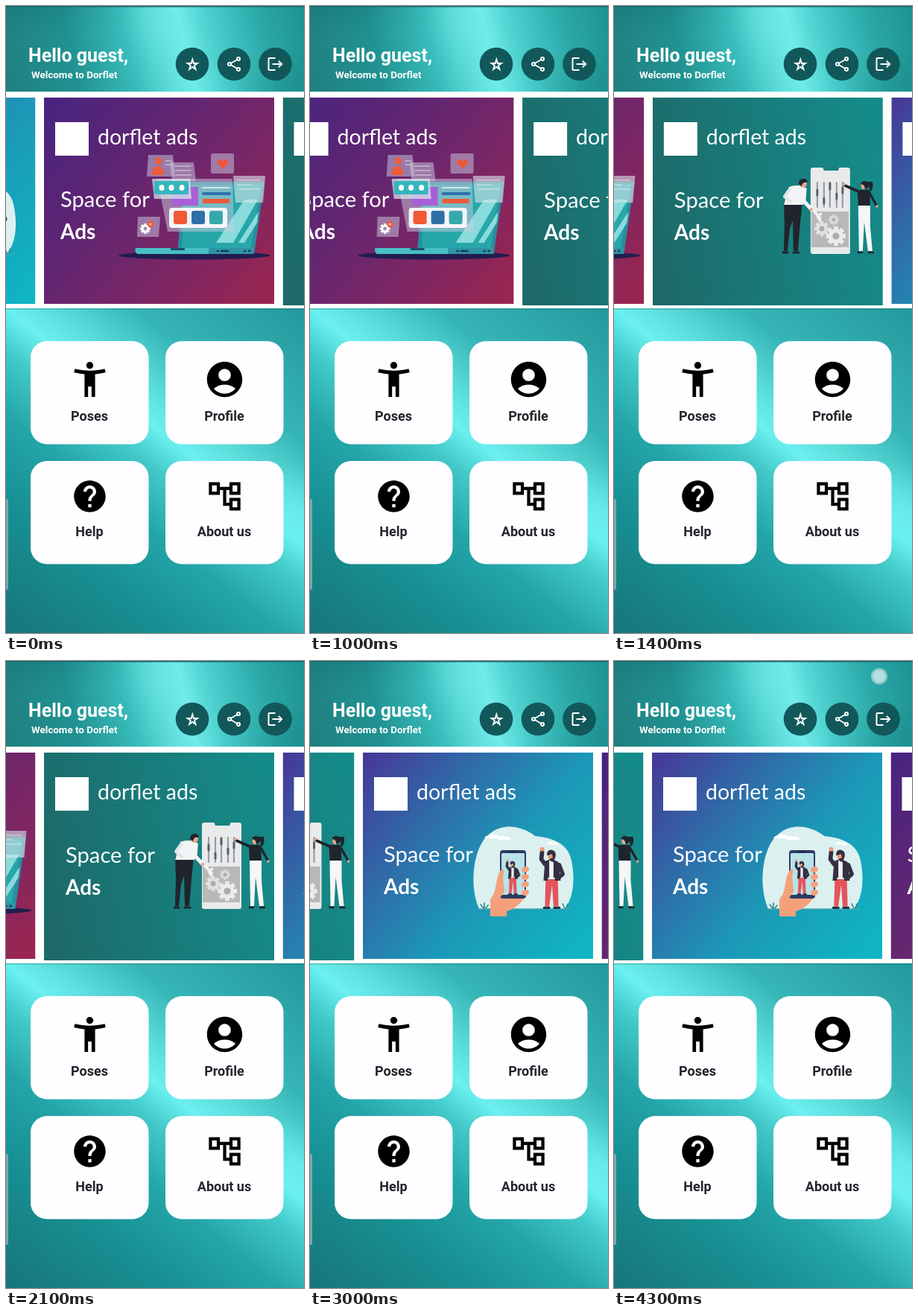
Recreate the animation shown at these times as an HTML page with a canvas. Size 400x842 px, loop 4500 ms.

```html
<!DOCTYPE html>
<html lang="en">
<head>
<meta charset="utf-8">
<title>Home screen</title>
<style>
html, body { margin: 0; width: 100%; height: 100%; overflow: hidden; background: #1c9090; }
canvas { display: block; width: 400px; height: 842px; }
</style>
</head>
<body>
<canvas id="stage"></canvas>
<script>
const W = 400, H = 842, LOOP = 4500, STEP = 100;
const CARD = { x: 51, w: 309, pitch: 320.5 };
const SLIDES = [{ start: 842, time: 600 }, { start: 2441, time: 800 }];
const ratio = Math.max(1, window.devicePixelRatio || 1);
const stage = document.getElementById('stage');

function prepare(canvas) {
  canvas.width = W * ratio;
  canvas.height = H * ratio;
  const c = canvas.getContext('2d');
  c.scale(ratio, ratio);
  return c;
}
const screen2d = prepare(stage);
let g = screen2d;

// Drawing helpers
function rect(x, y, w, h, color, r = 0) {
  g.fillStyle = color;
  g.beginPath();
  g.roundRect(x, y, w, h, r);
  g.fill();
}
function ellipse(x, y, rx, ry, color, turn = 0) {
  g.fillStyle = color;
  g.beginPath();
  g.ellipse(x, y, rx, ry, turn, 0, Math.PI * 2);
  g.fill();
}
const dot = (x, y, r, color) => ellipse(x, y, r, r, color);
function shape(d, color) {
  g.fillStyle = color;
  g.fill(new Path2D(d));
}
function line(d, color, width) {
  g.strokeStyle = color;
  g.lineWidth = width;
  g.lineCap = g.lineJoin = 'round';
  g.stroke(new Path2D(d));
}
function text(str, x, y, font, color = '#fff', align = 'left') {
  g.font = font;
  g.fillStyle = color;
  g.textAlign = align;
  g.fillText(str, x, y);
}
function blend([x0, y0, x1, y1], stops) {
  const fill = g.createLinearGradient(x0, y0, x1, y1);
  stops.forEach(([at, color]) => fill.addColorStop(at, color));
  return fill;
}
function glow(x, y, rx, ry, turn, rgb, alpha) {
  g.save();
  g.translate(x, y);
  g.rotate(turn);
  g.scale(rx, ry);
  const fill = g.createRadialGradient(0, 0, 0, 0, 0, 1);
  for (let i = 0; i <= 4; i++) {
    fill.addColorStop(i / 4, `rgba(${rgb},${alpha * (1 - i / 4) ** 1.4})`);
  }
  dot(0, 0, 1, fill);
  g.restore();
}
function icon(d, x, y, scale, color) {
  g.save();
  g.translate(x, y);
  g.scale(scale, scale);
  g.translate(-12, -12);
  shape(d, color);
  g.restore();
}
function gear(x, y, r, color, hole) {
  g.strokeStyle = color;
  g.lineWidth = r * 0.45;
  g.lineCap = 'butt';
  for (let i = 0; i < 8; i++) {
    const a = i * Math.PI / 4;
    g.beginPath();
    g.moveTo(x, y);
    g.lineTo(x + Math.cos(a) * r, y + Math.sin(a) * r);
    g.stroke();
  }
  dot(x, y, r * 0.75, color);
  dot(x, y, r * 0.35, hole);
}

// Brushed metal backdrop
function drawHeader() {
  g.save();
  g.beginPath();
  g.rect(0, 0, W, 115);
  g.clip();
  rect(0, 0, W, 115, blend([0, 95, 410, 0], [
    [0, '#20807f'], [.22, '#219292'], [.4, '#38bcbb'], [.53, '#62e0df'],
    [.58, '#6febe9'], [.67, '#4bcfce'], [.83, '#2aa8a8'], [1, '#1d8e8f']]));
  glow(205, 30, 55, 130, -.35, '115,240,240', .4);
  glow(30, 0, 170, 45, 0, '20,105,106', .35);
  glow(395, 105, 130, 60, -.3, '20,125,126', .4);
  rect(0, 0, W, 1.5, '#176a6b');
  g.restore();
}
function drawLowerMetal() {
  g.save();
  g.beginPath();
  g.rect(0, 406, W, H - 406);
  g.clip();
  rect(0, 406, W, H - 406, blend([-6, 826, 352, 373], [
    [0, '#18777c'], [.22, '#178f92'], [.38, '#23a5a7'], [.5, '#43c9c9'],
    [.575, '#6bf0ef'], [.64, '#5cdedd'], [.76, '#36b5b7'], [1, '#24999d']]));
  glow(395, 680, 90, 60, .6, '112,244,246', .5);
  rect(0, 406, W, 1.5, 'rgba(20,100,102,.35)');
  g.restore();
}

// Carousel pictures, laid out with the card's left edge at CARD.x
function laptopPicture() {
  const glass = 'rgba(205,205,225,.5)', pale = 'rgba(235,240,248,.8)';
  ellipse(253, 335, 102, 5.5, '#211d50');
  shape('M238 236H347L333 333H230Z', '#2b8c9c');
  shape('M242 240H342L329 325H236Z', '#27a7aa');
  shape('M320 260H338L305 318H282Z M339 276L337 291L320 318H312Z', '#8adbdc');
  shape('M174 325H272V333H176Q172 329 174 325Z', '#48bec5');
  shape('M272 325H334L332 333H272Z', '#2f93a4');
  rect(221, 325, 19, 3, '#1d4e68', 1);
  line('M284 329h1 M289 329h9 M320 329h1 M326 329h1', '#173c56', 2.5);
  shape('M203 232H304L306 303H217Z', glass);
  shape('M221 243H258V268H224Z', '#a860d6');
  line('M264 244H300', pale, 2);
  line('M265 252H300', '#2f72a8', 4);
  rect(264, 259, 36, 6, '#ec5a38', 1);
  rect(219, 271, 78, 27, '#f4f5f8', 4);
  ['#ee5a35', '#2f6fa8', '#36a9ac'].forEach((c, i) => rect(225 + i * 24, 275, 18, 18, c, 3));
  shape('M220 210H252L255 235H223Z', glass);
  line('M226 215H248 M227 221H248 M228 227H249', pale, 1.2);
  shape('M196 232H247L249 259H199Z', 'rgba(220,235,240,.7)');
  rect(199, 235, 46, 18, '#36b5bd', 2);
  [209, 222, 236].forEach(x => ellipse(x, 244, 3.5, 4, '#fff'));
  shape('M191 200H224L227 229H189Z', glass);
  dot(205, 208, 4.5, '#ef5c36');
  shape('M196 227Q196 215 204 215Q212 215 211 227Z', '#ef5c36');
  line('M214 208H222 M214 213H223', pale, 1.2);
  rect(275, 198, 31, 27, glass, 2);
  shape('M291 218Q280 210 286 206Q290 205 291 209Q293 205 297 207Q301 211 291 218Z', '#ee5637');
  shape('M305 228H348L345 264H308Z', 'rgba(215,230,235,.6)');
  line('M310 234H341 M311 240H330 M312 246H341', pale, 1.2);
  shape('M177 283H207L205 310H176Z', glass);
  gear(187, 299, 7, '#fff', '#a788a3');
  gear(194, 293, 4.5, '#ef5c36', '#d8c5d0');
}
function phonePicture() {
  const dark = '#20242c', skin = '#e9a78d';
  rect(263, 217, 53, 116, '#e9eaec', 3);
  shape('M279 216H302L300 221H281Z', '#17817f');
  rect(264, 276, 50, 48, '#b6b8ba');
  line('M272 237V270 M281 237V270 M289 237V270 M298 237V270 M306 237V270', '#999da0', 2.2);
  line('M272 247V254 M281 258V265 M289 238V246 M298 252V259 M306 244V251', '#5b6065', 3);
  gear(278, 299, 10, '#dfe1e3', '#a9abad');
  gear(297, 309, 13, '#e9ebed', '#a9abad');
  gear(294, 287, 7, '#d7d9db', '#a9abad');
  line('M262 269L276 285', '#f1f2f4', 4);
  line('M277 279L272 283L276 289', '#f1f2f4', 3);
  // man
  shape('M227 263H252L249 292L246 329H240L239 288L235 300L232 329H227L228 292Z', dark);
  shape('M234 243Q246 238 258 245L253 267H227Z', '#f3f4f5');
  line('M255 249L254 262L264 273', '#f3f4f5', 5);
  line('M235 246L228 256L236 263', '#e3e5e8', 4);
  dot(264, 273, 2.3, skin);
  dot(253, 239, 5, skin);
  shape('M247 239Q247 231 255 232Q261 235 258 237Q252 236 251 242Z', dark);
  line('M226 331H232 M240 331H247', dark, 3);
  // woman
  line('M327 249L309 241', dark, 3.6);
  line('M342 251L351 267', dark, 3.4);
  dot(308, 239, 2, skin);
  dot(352, 269, 1.8, skin);
  shape('M326 247H342L343 270H327Z', dark);
  shape('M327 268H343L343 295L346 329H340L335 290L333 329H328Z', '#f5f6f7');
  dot(335, 242, 4.3, skin);
  shape('M330 239Q332 233 339 236L346 236Q348 243 344 249Q341 248 342 242L336 247Q336 239 330 239Z', dark);
  line('M327 331H332 M341 331H347', dark, 2.6);
}
function waver(x, y, scale) {
  g.save();
  g.translate(x, y);
  g.scale(scale, scale);
  shape('M-8 26H9L10 64H3L1 34L-3 64H-9Z', '#e5545c');
  shape('M-9 1Q0 -4 10 2L13 28H5V24H-5V28H-11Z', '#352f42');
  rect(-3, 0, 6, 25, '#eef3f4');
  line('M-9 5L-14 -2L-13 -12', '#352f42', 6);
  line('M11 6L16 19L9 25', '#352f42', 5.5);
  dot(-13, -16, 3, '#f09a78');
  ellipse(0, -7, 5, 6.5, '#f09a78');
  shape('M-6 -7Q-7 -15 0 -15Q7 -14 6 -6L3 2Q-1 2 -3 -2L2 -4L1 -9Z', '#352f42');
  line('M-10 66H-3 M4 66H11', '#24304c', 3.5);
  g.restore();
}
function selfiePicture() {
  const skin = '#f4a17b';
  shape('M207 333C191 295 202 242 224 230C243 216 269 224 282 235C302 237 326 243 331 268C337 298 332 320 322 333Z', '#dcf0f0');
  shape('M214 238Q216 233 220 236Q223 229 228 234Q233 232 235 238Z M297 246Q302 240 306 244Q311 241 314 247Z M231 240Q236 232 241 236Q247 234 250 240Z', '#fff');
  line('M206 333H330', '#4fa6ad', 1.4);
  line('M213 332L209 327 M214 332V325 M216 332L219 328 M322 332L319 326 M324 332L326 326', '#2f8792', 1.6);
  shape('M222 343V320Q228 313 229 304L237 280L246 318L267 319Q257 333 244 336V343Z', skin);
  rect(235, 254, 35, 65, '#2c3b62', 4);
  rect(237, 258, 31, 56, '#b8e3e7', 1.5);
  rect(247, 255, 10, 2.5, '#1e294a', 1);
  waver(252, 277, .55);
  shape('M229 307Q231 285 238 279Q242 280 239 289L241 310L234 319Z', skin);
  [280, 290, 300, 311].forEach(y => ellipse(269, y, 5, 4, skin, -.2));
  waver(304, 268, .96);
}
const DIAGONAL = [51, 140, 360, 385];
const ADS = [
  { bottom: 400, textX: 73, drop: 0, picture: laptopPicture, axis: DIAGONAL,
    stops: [[0, '#48247f'], [.4, '#642670'], [.75, '#822660'], [1, '#9a264f']] },
  { bottom: 402, textX: 80, drop: 1, picture: phonePicture, axis: [51, 290, 360, 230],
    stops: [[0, '#1d6a69'], [.4, '#197877'], [1, '#158b89']] },
  { bottom: 400, textX: 79, drop: 0, picture: selfiePicture, axis: DIAGONAL,
    stops: [[0, '#453b98'], [.28, '#306aa8'], [.58, '#1c98b7'], [1, '#0fb6c3']] }
];
function drawAd(ad, x) {
  g.save();
  g.translate(x - CARD.x, 0);
  g.beginPath();
  g.rect(CARD.x, 123, CARD.w, ad.bottom - 123);
  g.clip();
  rect(CARD.x, 123, CARD.w, 279, blend(ad.axis, ad.stops));
  rect(66, 156, 45, 45, '#fff');
  text('dorflet ads', 123, 186, '28.5px Lato, sans-serif');
  text('Space for', ad.textX, 270 + ad.drop, '29.2px Lato, sans-serif');
  text('Ads', ad.textX, 313 + ad.drop, 'bold 28px Lato, sans-serif');
  ad.picture();
  g.restore();
}

// Fixed interface
const ICONS = {
  pose: 'M20.5 6c-2.61.7-5.67 1-8.5 1s-5.89-.3-8.5-1L3 8c1.86.5 4 .83 6 1v13h2v-6h2v6h2V9c2-.17 4.14-.5 6-1l-.5-2zM12 6c1.1 0 2-.9 2-2s-.9-2-2-2-2 .9-2 2 .9 2 2 2z',
  profile: 'M12 2C6.48 2 2 6.48 2 12s4.48 10 10 10 10-4.48 10-10S17.52 2 12 2zm0 4c1.93 0 3.5 1.57 3.5 3.5S13.93 13 12 13s-3.5-1.57-3.5-3.5S10.07 6 12 6zm0 14c-2.03 0-4.43-.82-6.14-2.88C7.55 15.8 9.68 15 12 15s4.45.8 6.14 2.12C16.43 19.18 14.03 20 12 20z',
  help: 'M12 2C6.48 2 2 6.48 2 12s4.48 10 10 10 10-4.48 10-10S17.52 2 12 2zm1 17h-2v-2h2v2zm2.07-7.75l-.9.92C13.45 12.9 13 13.5 13 15h-2v-.5c0-1.1.45-2.1 1.17-2.83l1.24-1.26c.37-.36.59-.86.59-1.41 0-1.1-.9-2-2-2s-2 .9-2 2H8c0-2.21 1.79-4 4-4s4 1.79 4 4c0 .88-.36 1.68-.93 2.25z',
  tree: 'M22 11V3h-7v3H9V3H2v8h7V8h2v10h4v3h7v-8h-7v3h-2V8h2v3h7zM7 9H4V5h3v4zm10 6h3v4h-3v-4zm0-10h3v4h-3V5z',
  leave: 'M17 7l-1.41 1.41L18.17 11H8v2h10.17l-2.58 2.58L17 17l5-5zM4 5h8V3H4c-1.1 0-2 .9-2 2v14c0 1.1.9 2 2 2h8v-2H4V5z',
  star: 'M12 8.89L12.94 12h2.82l-2.27 1.62.93 3.01L12 14.79l-2.42 1.84.93-3.01L8.24 12h2.82L12 8.89M12 2l-2.42 8H2l6.17 4.41L5.83 22 12 17.31 18.18 22l-2.35-7.59L22 10h-7.58L12 2z'
};
function tile(x, y, label, d, scale, iconY, labelY) {
  rect(x, y, 158.5, 138.5, '#fefdff', 22);
  icon(d, x + 79.5, iconY, scale, '#000');
  text(label, x + 79, labelY, 'bold 18px Roboto, sans-serif', '#24242a', 'center');
}
function drawInterface() {
  drawHeader();
  drawLowerMetal();
  rect(0, 115, W, 291, '#fff');
  text('Hello guest,', 30, 75, 'bold 25px Roboto, sans-serif');
  text('Welcome to Dorflet', 34, 96.5, 'bold 13.4px Roboto, sans-serif');
  [250, 306, 361.5].forEach(x => dot(x, 78, 22.3, '#12585a'));
  g.save();
  g.clip(new Path2D('M228 56H272V100H228Z'));
  icon(ICONS.star, 250.3, 78, .95, '#fff');
  g.restore();
  line('M312 71L300 78L312 85', '#fff', 1.8);
  [[312, 71], [300, 78], [312, 85]].forEach(([x, y]) => {
    dot(x, y, 3, '#fff');
    dot(x, y, 1.1, '#12585a');
  });
  icon(ICONS.leave, 361.5, 78, 1, '#fff');
  tile(33, 450, 'Poses', ICONS.pose, 2.36, 501.5, 557);
  tile(214, 450, 'Profile', ICONS.profile, 2.37, 501.5, 557);
  tile(33, 611, 'Help', ICONS.help, 2.12, 658.5, 711.5);
  tile(214, 611, 'About us', ICONS.tree, 2.12, 658.5, 711.5);
  rect(-4, 662, 7, 122, 'rgba(145,180,182,.8)', 2);
}

// Time curve: cubic bezier (.4, 0, .2, 1)
function ease(p) {
  if (p <= 0 || p >= 1) return p <= 0 ? 0 : 1;
  let low = 0, high = 1;
  for (let i = 0; i < 24; i++) {
    const s = (low + high) / 2, r = 1 - s;
    if (1.2 * s * r * r + 0.6 * s * s * r + s ** 3 < p) low = s; else high = s;
  }
  return low * low * (3 - 2 * low);
}

const backdrop = document.createElement('canvas');
g = prepare(backdrop);
drawInterface();
g = screen2d;

function draw(t) {
  g.drawImage(backdrop, 0, 0, W, H);
  const page = SLIDES.reduce((sum, s) => sum + ease((t - s.start) / s.time), 0);
  for (let i = -1; i <= 3; i++) {
    const x = CARD.x + (i - page) * CARD.pitch;
    if (x < W && x + CARD.w > 0) drawAd(ADS[(i + 3) % 3], x);
  }
  if (t >= 4300) {
    dot(356, 20.5, 11, 'rgba(170,215,217,.75)');
    dot(356, 20.5, 8.5, 'rgba(205,232,233,.65)');
  }
}
const began = performance.now();
function frame() {
  const t = (performance.now() - began) % LOOP;
  draw(Math.floor(t / STEP) * STEP);
  requestAnimationFrame(frame);
}
frame();
</script>
</body>
</html>
```
